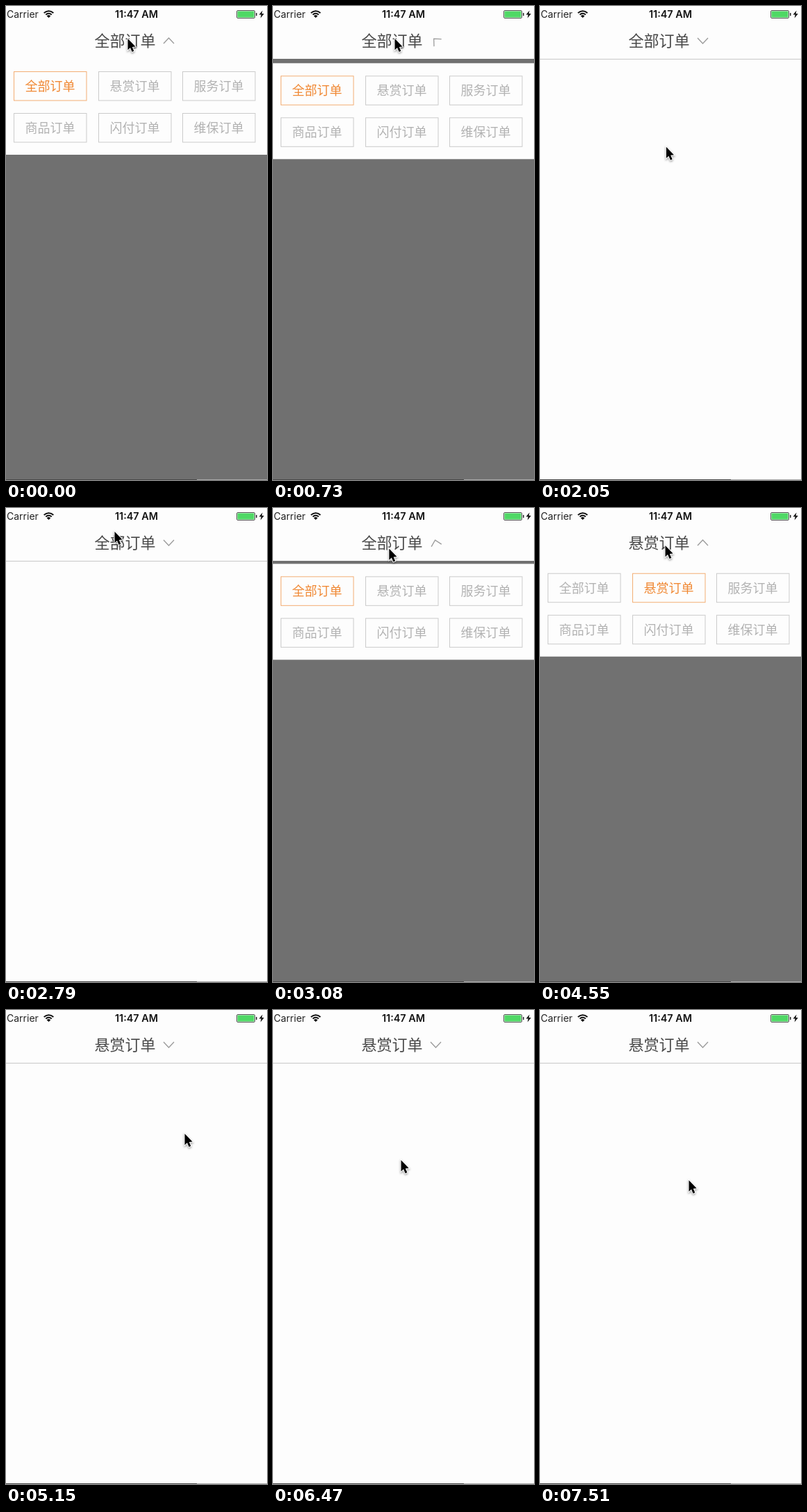
An HTML page with a canvas for the animation above (7.6 s loop, 376 by 682 pixels).

```html
<!DOCTYPE html>
<html lang="zh">
<head>
<meta charset="utf-8">
<style>
  html, body { margin: 0; width: 100%; height: 100%; overflow: hidden; background: #fdfdfd; }
  canvas { display: block; }
</style>
</head>
<body>
<canvas id="stage" width="376" height="682"></canvas>
<script>
const ctx = document.getElementById('stage').getContext('2d');
const LOOP = 7600, STEP = 146.8;
const WHITE = '#fdfdfd', ORANGE = '#f08833';
const CJK = '"Noto Sans CJK SC", "Noto Sans CJK", sans-serif';
const LABELS = ['全部订单', '悬赏订单', '服务订单', '商品订单', '闪付订单', '维保订单'];
const HEADER = 76, PANEL = 138, SELECT_TIME = 3478;

// [time, opens]
const toggles = [
  [-2000, true], [10, false], [545, true], [1700, false],
  [2850, true], [SELECT_TIME, false], [4150, true], [4620, false]
];

// [time, x, y] of the pointer tip
const pointerPath = [
  [0, 175, 47], [800, 175, 47], [1500, 190, 262], [1760, 190, 262],
  [2640, 157, 36], [2789, 156, 34], [2880, 156, 34], [3380, 186, 102],
  [3670, 185, 101], [4110, 180, 54], [4700, 180, 54], [5138, 257, 178],
  [5285, 285, 186], [5720, 142, 206], [6015, 182, 219], [6400, 182, 219],
  [6455, 184, 216], [6700, 184, 216], [7487, 214, 245]
];

const clamp = v => Math.max(0, Math.min(1, v));
const ease = u => { u = clamp(u); return u * u * (3 - 2 * u); };

function spring(ms) {
  const s = ms / 1000, w = 16.6, decay = 16.3;
  return 1 - Math.exp(-decay * s) * (Math.cos(w * s) + decay / w * Math.sin(w * s));
}

function menuState(t) {
  const [start, opens] = toggles.filter(item => item[0] <= t).pop();
  const turn = ease((t - start) / 280);
  return opens
    ? { shown: spring(t - start), angle: Math.PI * turn }
    : { shown: 1 - turn, angle: Math.PI * (1 + turn) };
}

function pointerAt(t) {
  const next = pointerPath.findIndex(point => point[0] > t);
  if (next < 0) return pointerPath[pointerPath.length - 1].slice(1);
  const [t0, x0, y0] = pointerPath[next - 1], [t1, x1, y1] = pointerPath[next];
  const k = ease((t - t0) / (t1 - t0));
  return [x0 + (x1 - x0) * k, y0 + (y1 - y0) * k];
}

function rect(x, y, w, h, color) {
  ctx.fillStyle = color;
  ctx.fillRect(x, y, w, h);
}

function text(label, x, y, font, color, align = 'center') {
  ctx.font = font;
  ctx.fillStyle = color;
  ctx.textAlign = align;
  ctx.fillText(label, x, y);
}

function polyline(points, closed) {
  ctx.beginPath();
  points.forEach(([x, y]) => ctx.lineTo(x, y));
  if (closed) ctx.closePath();
}

function drawStatusBar() {
  text('Carrier', 1, 17, '14px Inter, sans-serif', '#222', 'left');
  text('11:47 AM', 188, 17, '600 14.4px Inter, sans-serif', '#111');

  ctx.strokeStyle = ctx.fillStyle = '#111';
  ctx.lineWidth = 2;
  for (const radius of [5.7, 9.3]) {
    ctx.beginPath();
    ctx.arc(61.5, 16.5, radius, -Math.PI * 0.76, -Math.PI * 0.24);
    ctx.stroke();
  }
  ctx.beginPath();
  ctx.moveTo(61.5, 17);
  ctx.arc(61.5, 17, 3.8, -Math.PI * 0.76, -Math.PI * 0.24);
  ctx.fill();

  ctx.lineWidth = 1;
  ctx.strokeStyle = '#555';
  ctx.beginPath();
  ctx.roundRect(332.5, 6.5, 26, 11, 1.5);
  ctx.stroke();
  rect(333.5, 7.5, 24, 9, '#4fd865');
  rect(360, 10, 1.5, 4, '#222');
  ctx.fillStyle = '#111';
  polyline([[369.5, 6.5], [364.5, 12.6], [367.6, 12.6], [366.6, 17.5], [371.8, 11], [368.6, 11]], true);
  ctx.fill();
}

function drawPanel(shown, selected) {
  const shift = PANEL * (shown - 1);
  ctx.save();
  ctx.beginPath();
  ctx.rect(0, HEADER, 376, 605);
  ctx.clip();
  rect(0, HEADER, 376, 605, `rgba(0,0,0,${0.555 * clamp(shown)})`);
  ctx.translate(0, shift);
  rect(0, HEADER, 376, PANEL, WHITE);
  ctx.globalAlpha = clamp(shown);
  ctx.lineWidth = 1;
  LABELS.forEach((label, i) => {
    const x = Math.round(12 + 121.7 * (i % 3)) - 0.5;
    const y = 94.5 + 60 * Math.floor(i / 3);
    const active = i === selected;
    ctx.strokeStyle = active ? '#f3ae74' : '#cbcbcb';
    ctx.strokeRect(x, y, 104.5, 41.5);
    text(label, x + 52, y + 27.5, '18px ' + CJK, active ? ORANGE : '#b2b2b2');
  });
  ctx.restore();
}

function drawHeader(shown, angle, title) {
  rect(0, HEADER, 376, 1, `rgba(200,200,200,${1 - clamp(shown)})`);
  text(title, 171.5, 57.5, '22px ' + CJK, '#484848');
  ctx.save();
  ctx.translate(234.5, 50);
  ctx.rotate(angle);
  ctx.strokeStyle = '#9a9a9a';
  ctx.lineWidth = 1.3;
  polyline([[-7.5, -4], [0, 4], [7.5, -4]]);
  ctx.stroke();
  ctx.restore();
}

function drawPointer(x, y) {
  ctx.save();
  ctx.translate(x, y);
  polyline([[0.5, 0], [0.5, 16.2], [4, 12.9], [6.6, 19], [9.3, 17.8], [6.8, 11.9], [11.6, 11.6]], true);
  ctx.shadowColor = 'rgba(0,0,0,.4)';
  ctx.shadowBlur = 3;
  ctx.shadowOffsetY = 1.5;
  ctx.strokeStyle = '#fff';
  ctx.lineWidth = 2;
  ctx.stroke();
  ctx.shadowColor = 'transparent';
  ctx.fillStyle = '#000';
  ctx.fill();
  ctx.restore();
}

function draw(t) {
  const { shown, angle } = menuState(t);
  const selected = t < SELECT_TIME ? 0 : 1;
  rect(0, 0, 376, 682, WHITE);
  if (shown > 0) drawPanel(shown, selected);
  drawStatusBar();
  drawHeader(shown, angle, LABELS[selected]);
  rect(0, 681, 275, 1, '#484848');
  rect(275, 681, 101, 1, '#a8a8a8');
  drawPointer(...pointerAt(t));
}

// The screen refreshes at a fixed, low frame rate.
function tick() {
  const t = performance.now() % LOOP;
  draw(Math.floor((t + 8) / STEP) * STEP);
  requestAnimationFrame(tick);
}
tick();
</script>
</body>
</html>
```
